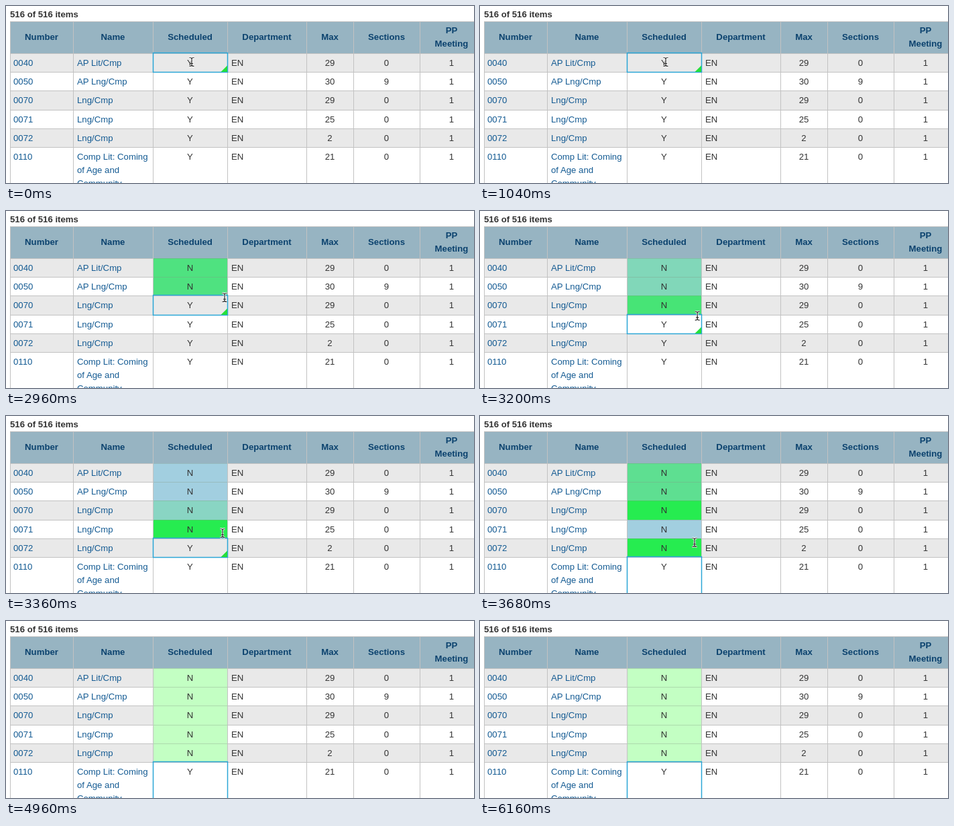
An HTML page for the animation above (6240 ms loop, 698 by 266 pixels).

```html
<!DOCTYPE html>
<html lang="en">
<head>
<meta charset="utf-8">
<title>Fill down</title>
<style>
  html, body { margin: 0; width: 100%; height: 100%; overflow: hidden; background: #fff; }
  svg { display: block; width: 698px; height: 266px; }
  text { font: 13.2px "Liberation Sans", Arial, sans-serif; fill: #333; }
  .bold { font-weight: bold; }
  .head { font-weight: bold; fill: #0b426e; }
  .link { fill: #145b93; }
  .mid { text-anchor: middle; }
</style>
</head>
<body>
<svg id="stage" viewBox="0 0 698 266"></svg>
<script>
const LOOP = 6240, STEP = 80;
const cols = [6, 100, 219, 330, 448, 518, 617, 712];
const tops = [71, 99, 127, 156, 184, 212, 280];
const heads = ['Number', 'Name', 'Scheduled', 'Department', 'Max', 'Sections', 'PP|Meeting'];
const rows = [
  ['0040', 'AP Lit/Cmp', 29, 0],
  ['0050', 'AP Lng/Cmp', 30, 9],
  ['0070', 'Lng/Cmp', 29, 0],
  ['0071', 'Lng/Cmp', 25, 0],
  ['0072', 'Lng/Cmp', 2, 0],
  ['0110', 'Comp Lit: Coming|of Age and|Community', 21, 0]
];
const BLUE = [162, 207, 224], GREEN = [38, 236, 80];
const SAVED = '#c3ffc3', EDITED = '#ffffd9';
const TYPED = 1280;

// Pulse per row: [time, share of green]; the last time marks the save.
const firstPulse = [[2800, 1], [2960, .67], [3360, 0], [3680, .55], [4000, 1], [4240, .6]];
const pulses = [
  firstPulse,
  firstPulse,
  [[3120, 1], [3360, .2], [3440, 0], [3680, 1], [4000, 0], [4240, .7]],
  [[3280, 1], [3360, 1], [3680, 0], [4000, 1], [4240, .3]],
  [[3600, 1], [3680, 1], [4000, 0], [4320, 1], [4480, .6]]
];
const selections = [[0, 0], [2800, 2], [3120, 3], [3280, 4], [3600, 5]];
const pointer = [
  [0, 277, 84], [1440, 277, 84], [2000, 325, 98], [2560, 325, 98], [2960, 326, 130],
  [3360, 323, 176], [3680, 320, 190], [3920, 320, 192], [4320, 318, 280]
];

const stage = document.getElementById('stage');

function add(tag, attrs, content) {
  const el = document.createElementNS('http://www.w3.org/2000/svg', tag);
  for (const key in attrs) el.setAttribute(key, attrs[key]);
  if (content !== undefined) el.textContent = content;
  stage.appendChild(el);
  return el;
}
const box = (x, y, width, height, fill) => add('rect', { x, y, width, height, fill });
const label = (x, y, style, content) => add('text', { x, y, class: style }, content);
const center = i => i === 6 ? 664.5 : (cols[i] + cols[i + 1]) / 2;

// Table ground and grid
box(6, 23, 692, 48, '#97b4c2');
for (let r = 0; r < 6; r += 2) box(6, tops[r], 692, tops[r + 1] - tops[r], '#e9e9e9');
for (const x of cols) box(x, 23, 1, 243, '#c2c2c2');
for (const y of [23, ...tops]) box(6, y, 692, 1, '#c2c2c2');

const fills = pulses.map((p, r) => box(220, tops[r], 110, tops[r + 1] - tops[r], 'none'));
const seams = pulses.map((p, r) => box(220, tops[r], 110, 1, 'rgba(130,150,130,.35)'));

// Text
label(6, 17, 'bold', '516 of 516 items');
heads.forEach((head, i) => {
  const lines = head.split('|');
  lines.forEach((line, n) =>
    label(center(i), lines.length > 1 ? 41 + 20 * n : 51, 'head mid', line));
});
const flags = rows.map(([number, name, max, sections], r) => {
  const y = tops[r] + 19;
  label(11, y, 'link', number);
  name.split('|').forEach((line, n) => label(106, y + 20 * n, 'link', line));
  label(336, y, '', 'EN');
  label(center(4), y, 'mid', max);
  label(center(5), y, 'mid', sections);
  label(center(6), y, 'mid', 1);
  return label(center(2), y, 'mid', 'Y');
});

// Selected cell, fill handle and text pointer
const frame = add('rect', { x: 219.5, width: 111, fill: 'none', stroke: '#2ba6d6', 'stroke-width': 1.5 });
const handle = add('path', { d: 'M320.5 0h9.5v-9.5z', fill: '#25e03a' });
const beam = 'M-3.5 -6.5Q-.5 -6.5 0 -5Q.5 -6.5 3.5 -6.5M0 -5V5M-3.5 6.5Q-.5 6.5 0 5Q.5 6.5 3.5 6.5M-2 2.5H2';
const cursor = [['#fff', 2.8], ['#222', 1.2]].map(([stroke, width]) =>
  add('path', { d: beam, fill: 'none', stroke, 'stroke-width': width }));

function sample(keys, t) {
  let i = 0;
  while (i < keys.length - 2 && t >= keys[i + 1][0]) i++;
  const a = keys[i], b = keys[i + 1];
  const k = Math.min(1, Math.max(0, (t - a[0]) / (b[0] - a[0])));
  return a.slice(1).map((v, n) => v + (b[n + 1] - v) * k);
}

function cellColor(r, t) {
  const keys = pulses[r];
  if (t < keys[0][0]) return r === 0 && t >= TYPED ? EDITED : 'none';
  if (t >= keys[keys.length - 1][0]) return SAVED;
  const [k] = sample(keys, t);
  return `rgb(${BLUE.map((v, i) => Math.round(v + (GREEN[i] - v) * k))})`;
}

function draw(t) {
  pulses.forEach((keys, r) => {
    const color = cellColor(r, t);
    fills[r].setAttribute('fill', color);
    seams[r].setAttribute('visibility', color === 'none' ? 'hidden' : 'visible');
    flags[r].textContent = t >= (r ? keys[0][0] : TYPED) ? 'N' : 'Y';
  });
  const row = selections.filter(s => t >= s[0]).pop()[1];
  frame.setAttribute('y', tops[row] - .5);
  frame.setAttribute('height', tops[row + 1] - tops[row] + 1);
  handle.setAttribute('transform', `translate(0 ${tops[row + 1]})`);
  const [x, y] = sample(pointer, t);
  for (const part of cursor) part.setAttribute('transform', `translate(${x} ${y})`);
}

function tick() {
  draw(Math.floor(performance.now() % LOOP / STEP) * STEP);
  requestAnimationFrame(tick);
}
tick();
</script>
</body>
</html>
```
